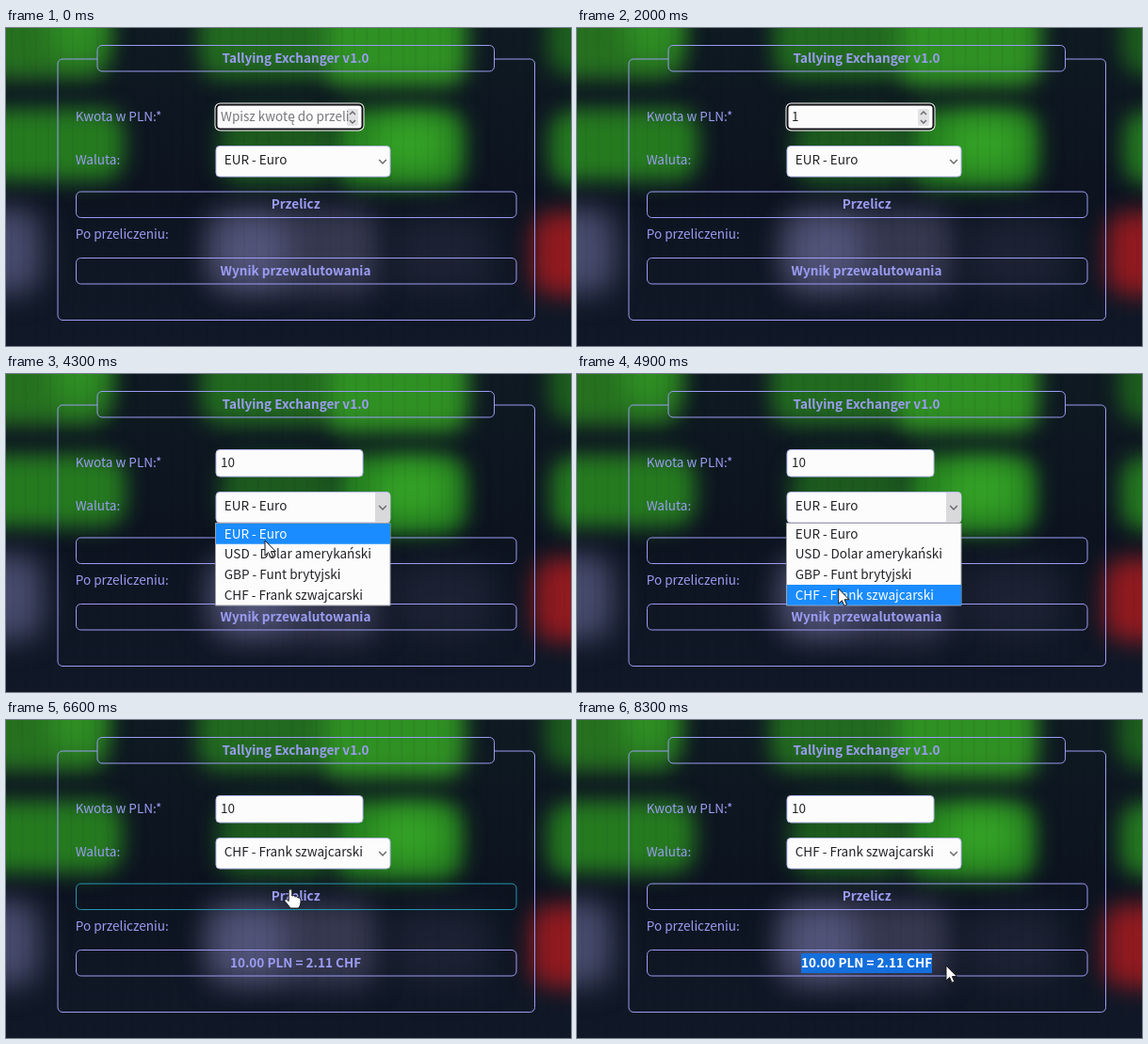
These frames come from a looping animation (600x338 px, 8.4 s). An HTML page with a canvas:

```html
<!DOCTYPE html>
<html lang="pl">
<head>
<meta charset="utf-8">
<title>Tallying Exchanger v1.0</title>
<style>
html, body { margin: 0; width: 100%; height: 100%; overflow: hidden; background: #0e1622; }
canvas { display: block; width: 600px; height: 338px; }
</style>
</head>
<body>
<canvas id="stage" width="600" height="338"></canvas>
<script>
const W = 600, H = 338, LOOP = 8400, STEP = 100;
const ctx = document.getElementById('stage').getContext('2d');
const FAMILY = '"Noto Sans CJK JP", "Noto Sans CJK SC", "Noto Sans CJK", "Noto Sans", sans-serif';
const REGULAR = `400 13.55px ${FAMILY}`, BOLD = `700 13.55px ${FAMILY}`;
const LILAC = '#9b9cf3', INK = '#222226';
const OPTIONS = ['EUR - Euro', 'USD - Dolar amerykański', 'GBP - Funt brytyjski', 'CHF - Frank szwajcarski'];

// Pointer path: time, x, y
const PATH = [
  [2600, 281, 95], [3400, 281, 95], [3800, 285, 141], [4000, 285, 142],
  [4300, 275, 177], [4500, 275, 178], [5000, 278, 234], [5600, 279, 238],
  [5800, 279, 238], [6200, 302, 180], [6700, 302, 180], [7200, 236, 258],
  [7400, 236, 258], [8000, 386, 259], [8200, 392, 261]
];

const ease = u => u * u * (3 - 2 * u);

function pointerAt(t) {
  if (t < PATH[0][0]) return null;
  for (let i = 1; i < PATH.length; i++) {
    const [t0, x0, y0] = PATH[i - 1], [t1, x1, y1] = PATH[i];
    if (t < t1) {
      const u = ease((t - t0) / (t1 - t0));
      return { x: x0 + (x1 - x0) * u, y: y0 + (y1 - y0) * u };
    }
  }
  const [, x, y] = PATH[PATH.length - 1];
  return { x, y };
}

function box(x, y, w, h, r, stroke, fill, width = 1, c = ctx) {
  c.beginPath();
  c.roundRect(x, y, w, h, r);
  if (fill) { c.fillStyle = fill; c.fill(); }
  if (stroke) { c.strokeStyle = stroke; c.lineWidth = width; c.stroke(); }
}

function line(points, color, width) {
  ctx.beginPath();
  points.forEach(([x, y]) => ctx.lineTo(x, y));
  ctx.strokeStyle = color;
  ctx.lineWidth = width;
  ctx.stroke();
}

function text(str, x, y, color = LILAC, font = REGULAR, align = 'left') {
  ctx.font = font;
  ctx.textAlign = align;
  ctx.fillStyle = color;
  ctx.fillText(str, x, y);
}

// Out-of-focus display, painted once with a margin for the drift
const PAD = 20;
const backdrop = (() => {
  const cv = document.createElement('canvas');
  cv.width = W + 2 * PAD;
  cv.height = H;
  const c = cv.getContext('2d');
  const base = c.createLinearGradient(0, 0, 0, H);
  base.addColorStop(0, '#0f1a22');
  base.addColorStop(0.5, '#0d1420');
  base.addColorStop(1, '#111928');
  c.fillStyle = base;
  c.fillRect(0, 0, cv.width, H);
  c.translate(PAD, 0);

  const glow = (left, top, right, bottom, color, blur = 11) => {
    c.filter = `blur(${blur}px)`;
    box(left, top, right - left, bottom - top, 24, null, color, 1, c);
  };

  // Upper row
  glow(-40, -40, 112, 54, '#267020');
  glow(48, -30, 104, 34, '#2f8f24', 14);
  glow(206, -40, 345, 54, '#226a20');
  glow(335, -40, 490, 62, '#2f9023');
  glow(576, -40, 650, 50, '#1d5e1e');
  // Middle row
  glow(-40, 86, 126, 162, '#257a20');
  glow(228, 88, 350, 166, '#1c5a1e');
  glow(350, 86, 488, 170, '#258020');
  glow(390, 96, 470, 150, '#34a026', 14);
  glow(578, 88, 650, 166, '#247820');
  // Lower row
  glow(-50, 192, 38, 282, '#474b6c', 15);
  glow(212, 192, 398, 284, '#35384f', 14);
  glow(225, 202, 300, 272, '#52557a', 16);
  glow(412, 202, 516, 280, '#1c2233', 16);
  glow(560, 196, 650, 284, '#8f1a20', 12);

  c.filter = 'none';
  c.fillStyle = 'rgba(0,0,0,.04)';
  for (let x = -PAD; x < W + PAD; x += 13) c.fillRect(x, 0, 2, H);
  return cv;
})();

function focusRing(x, y, w, h) {
  box(x - 0.5, y - 0.5, w + 1, h + 1, 5, '#ffffff', '#fcfcfd', 2);
  box(x + 0.5, y + 0.5, w - 1, h - 1, 4, '#101014', null, 2);
}

function chevron(x, y, dir, size, color, width) {
  line([[x - size, y - dir * size / 2], [x, y + dir * size / 2], [x + size, y - dir * size / 2]], color, width);
}

function drawInput(value, focused) {
  if (focused) focusRing(223, 81, 156, 27);
  else box(223, 80.5, 156, 28.5, 4, '#b7b6f2', '#fcfcfd');
  if (focused) {
    box(362, 86, 12, 18, 2, null, '#e2e2e4');
    chevron(368, 90.5, -1, 3, '#66666b', 1.4);
    chevron(368, 99.5, 1, 3, '#66666b', 1.4);
  }
  ctx.save();
  ctx.beginPath();
  ctx.rect(226, 82, 139, 26);
  ctx.clip();
  text(value || 'Wpisz kwotę do przeliczenia', 228, 99, value ? INK : '#77777c');
  ctx.restore();
}

function drawSelect(choice, focused, open) {
  if (focused) focusRing(223, 126, 185, 32);
  else box(223, 125.5, 185, 32.5, 4, '#b7b6f2', '#fcfcfd');
  if (open) box(392, 126, 16, 32, [0, 4, 4, 0], null, '#d9d9dc');
  text(OPTIONS[choice], 231.7, 145, INK);
  chevron(400, 142, 1, 3.8, '#66666b', 1.4);
}

function drawList(active) {
  box(222.5, 158.5, 185.5, 87.5, 0, '#a0a0a8', '#fcfcfd');
  OPTIONS.forEach((name, i) => {
    const y = 159 + i * 21.7;
    if (i === active) box(223, y, 185, 21.7, 0, null, '#1a8cff');
    text(name, 231.7, y + 15.7, i === active ? '#ffffff' : INK);
  });
}

function drawResult(str, selection) {
  text(str, 307.5, 263, LILAC, BOLD, 'center');
  if (selection <= 0) return;
  const w = ctx.measureText(str).width, x = 307.5 - w / 2;
  ctx.save();
  ctx.beginPath();
  ctx.rect(x, 248, w * selection, 21);
  ctx.clip();
  ctx.fillStyle = '#146fdc';
  ctx.fillRect(x, 248, w, 21);
  text(str, 307.5, 263, '#ffffff', BOLD, 'center');
  ctx.restore();
}

function drawBeam() {
  const beam = [[[-3, -7], [3, -7]], [[0, -7], [0, 7]], [[-3, 7], [3, 7]]];
  for (const [color, width] of [['#ffffff', 2.6], ['#17171a', 1.3]])
    beam.forEach(part => line(part, color, width));
}

function drawShape(path) {
  const p = new Path2D(path);
  ctx.fillStyle = '#ffffff';
  ctx.strokeStyle = '#17171a';
  ctx.lineWidth = 1;
  ctx.fill(p);
  ctx.stroke(p);
}

const ARROW = 'M0 0V16L3.7 12.6L6.1 18.2L8.8 17L6.4 11.6H11.4Z';
const HAND = 'M-1.8 1Q0 -1.5 1.8 1V7Q4 5.5 5.2 8Q7 6.8 8.2 9Q11 8 11 11V14Q11 17 8.5 20H0Q-2 17 -6 12.5Q-5.8 9.5 -3.5 11L-1.8 12.5Z';

function drawPointer(p, t, open, hover) {
  const inInput = p.y > 80 && p.y < 109;
  const onResult = t >= 7100 && p.x < 378 && p.y > 248;
  ctx.save();
  ctx.translate(p.x, p.y);
  if (hover) drawShape(HAND);
  else if (!open && (inInput || onResult)) drawBeam();
  else drawShape(ARROW);
  ctx.restore();
}

function draw(t) {
  const p = pointerAt(t);
  const open = t >= 3900 && t < 5200;
  const hover = p && t >= 5800 && p.y > 173 && p.y < 202;
  const value = t < 1900 ? '' : t < 2200 ? '1' : '10';
  const drift = 2.8 * Math.sin(2 * Math.PI * (t - 500) / LOOP);

  ctx.drawImage(backdrop, drift - PAD, 0);

  // Frame, broken where the legend sits
  ctx.save();
  ctx.beginPath();
  ctx.rect(0, 0, 97, H);
  ctx.rect(518, 0, W - 518, H);
  ctx.rect(97, 60, 421, H);
  ctx.clip();
  box(55, 33, 506.5, 277.5, 5, LILAC);
  ctx.restore();
  box(97, 18.5, 421.5, 27.5, 5, LILAC);
  text('Tallying Exchanger v1.0', 307.5, 37, LILAC, BOLD, 'center');

  text('Kwota w PLN:*', 73.7, 99);
  text('Waluta:', 73.7, 145);
  text('Po przeliczeniu:', 73.7, 224);

  drawInput(value, t < 3900);
  drawSelect(t < 5200 ? 0 : 3, t >= 5200 && t < 6400, open);

  box(74.5, 174, 467.5, 27.5, 5, hover ? '#2796ad' : LILAC);
  text('Przelicz', 307.7, 192.2, LILAC, BOLD, 'center');
  box(74.5, 244.5, 467.5, 27.5, 5, LILAC);
  const selection = t < 7400 ? 0 : Math.min(1, Math.max(0, (p.x - 238) / 139));
  drawResult(t < 6400 ? 'Wynik przewalutowania' : '10.00 PLN = 2.11 CHF', selection);

  if (open) drawList(Math.max(0, Math.min(3, Math.floor((p.y - 159) / 21.7))));
  if (p) drawPointer(p, t, open, hover);
}

const start = performance.now();
function tick() {
  const t = (performance.now() - start) % LOOP;
  draw(Math.floor(t / STEP) * STEP);
  requestAnimationFrame(tick);
}
tick();
</script>
</body>
</html>
```
